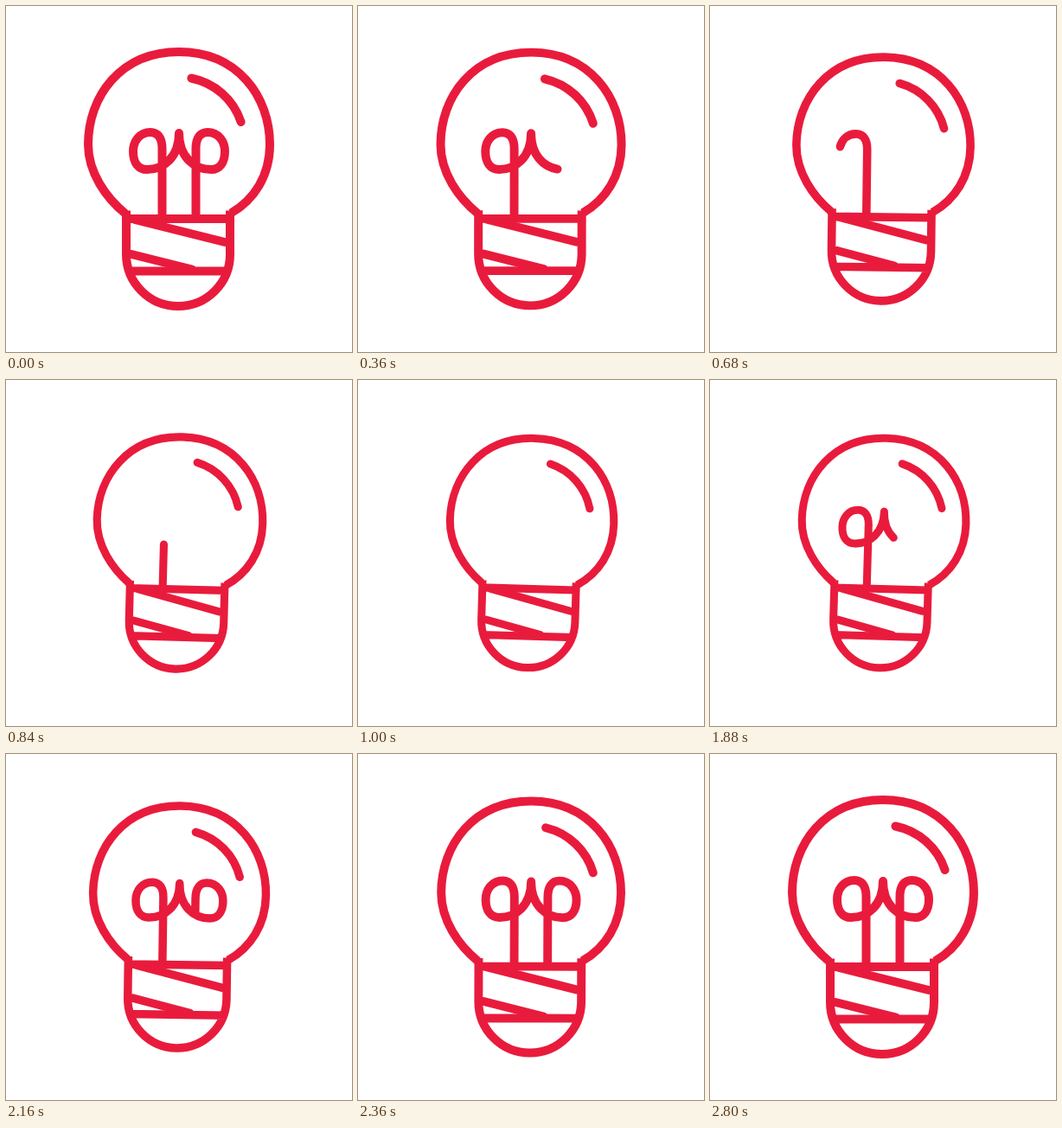
An HTML page with a canvas for the animation above (2.88 s loop, 400 by 400 pixels).

```html
<!DOCTYPE html>
<html lang="en">
<head>
<meta charset="utf-8">
<title>Light bulb</title>
<style>
  html, body { margin: 0; width: 100%; height: 100%; overflow: hidden; background: #fff; }
  canvas { display: block; width: 400px; height: 400px; }
</style>
</head>
<body>
<canvas id="stage" width="400" height="400"></canvas>
<script>
const ctx = document.getElementById('stage').getContext('2d');

const LOOP = 2880, STEP = 40, LAST_STEP = 2800;
const RED = '#e91b3d';
const RAD = Math.PI / 180;

const glass = new Path2D(
  'M138 240 C116 222 95 193 95 160 C95 105 132 53 200 53 ' +
  'C268 53 305 105 305 160 C305 196 287 224 260 239.5');
const socket = new Path2D(
  'M139 236.5 V287 A60 60 0 0 0 259 287 V236.5 ' +
  'M139 246 H259 M139 306.5 H259');
const threads = new Path2D('M149 247 L253 273 M145 287 L215 304.5');

const filamentData =
  'M180.5 243 V165 C180.5 152 175 146 167 146 C154 146 147 157 147 168 ' +
  'C147 181 153 189 163 189 C182 189 200 175 200 147 ' +
  'C200 175 218 189 237 189 C247 189 253 181 253 168 ' +
  'C253 157 246 146 233 146 C225 146 219.5 152 219.5 165 V243';
const filament = new Path2D(filamentData);
const measure = document.createElementNS('http://www.w3.org/2000/svg', 'path');
measure.setAttribute('d', filamentData);
const filamentLength = measure.getTotalLength();

const clamp = v => Math.min(1, Math.max(0, v));
const smooth = v => v * v * (3 - 2 * v);

// Cubic timing curve with handles (x1, 0) and (x2, 1).
function ease(x, x1, x2) {
  let lo = 0, hi = 1;
  for (let i = 0; i < 30; i++) {
    const s = (lo + hi) / 2, r = 1 - s;
    if (3 * r * r * s * x1 + 3 * r * s * s * x2 + s * s * s < x) lo = s;
    else hi = s;
  }
  return smooth((lo + hi) / 2);
}

function turn(angle, x, y) {
  ctx.translate(x, y);
  ctx.rotate(angle * RAD);
  ctx.translate(-x, -y);
}

function drawFilament(amount) {
  if (amount <= 0) return;
  ctx.setLineDash(amount < 1 ? [filamentLength * amount, filamentLength * 2] : []);
  ctx.stroke(filament);
  ctx.setLineDash([]);
}

function drawGlint(angle) {
  ctx.save();
  turn(angle, 199.5, 158);
  ctx.beginPath();
  ctx.arc(199.5, 158, 76, -78.7 * RAD, -18.4 * RAD);
  ctx.stroke();
  ctx.restore();
}

function draw(t) {
  const swing = Math.max(0, Math.min(t, 2852 - t));
  const shrink = ease(clamp(swing / 1440), 0.86, 0.1);
  const scale = 1 - 0.104 * shrink;
  const lit = t < 1200 ? 1 - clamp(t / 950) : clamp((t - 1325) / 960);

  ctx.fillStyle = '#fff';
  ctx.fillRect(0, 0, 400, 400);
  ctx.save();
  turn(1.8 * shrink, 200, 200);
  ctx.translate(200, 200);
  ctx.scale(scale, scale);
  ctx.translate(-200, -200);

  ctx.strokeStyle = RED;
  ctx.lineWidth = 10;
  ctx.lineJoin = 'round';
  ctx.lineCap = 'butt';
  ctx.stroke(glass);
  ctx.stroke(socket);
  ctx.lineCap = 'round';
  ctx.stroke(threads);
  drawFilament(lit);
  drawGlint(7 * smooth(clamp(swing / 1426)));
  ctx.restore();
}

function tick() {
  const t = performance.now() % LOOP;
  draw(Math.min(LAST_STEP, Math.floor(t / STEP) * STEP));
  requestAnimationFrame(tick);
}
draw(0);
requestAnimationFrame(tick);
</script>
</body>
</html>
```
